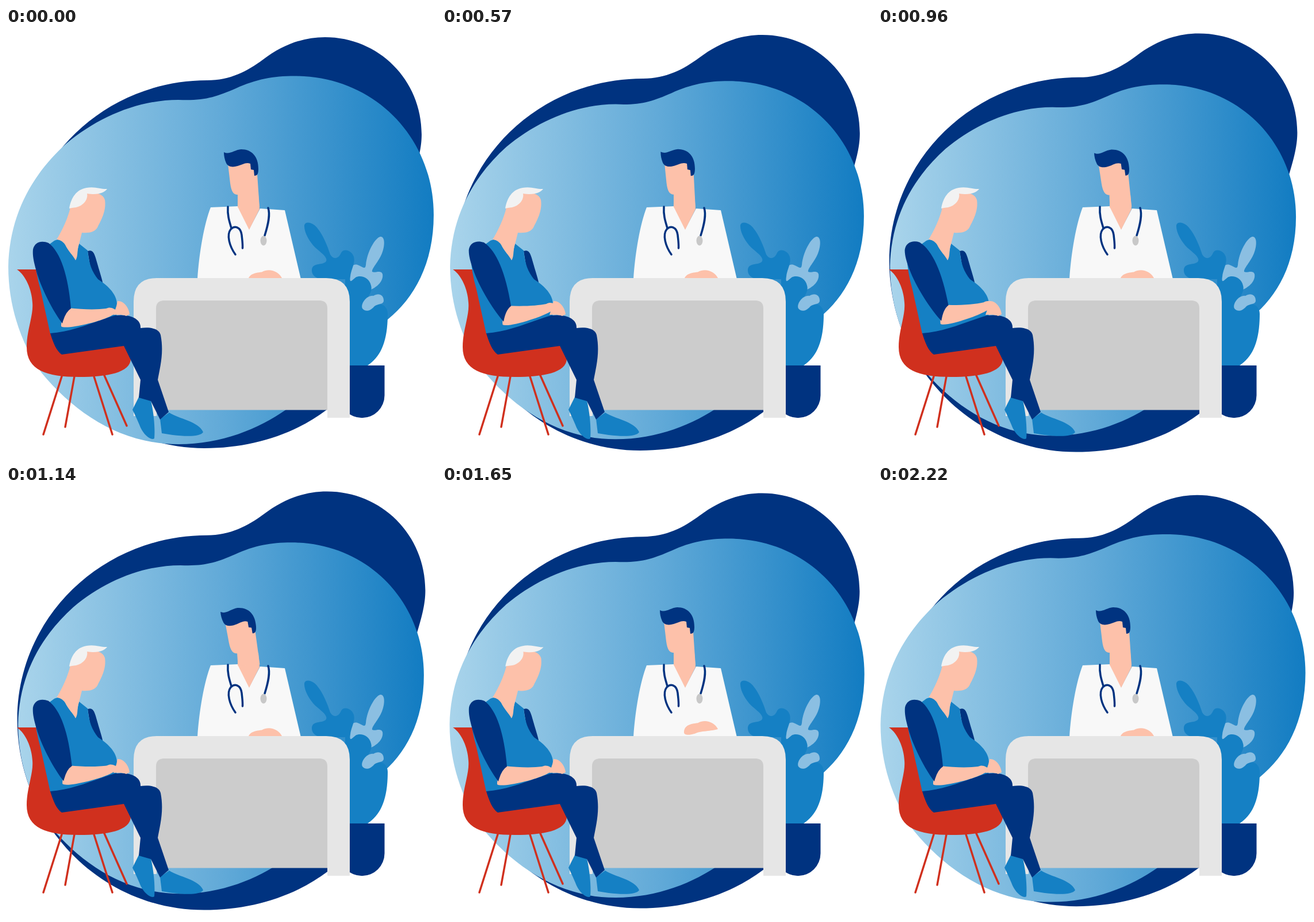
Write an HTML page that moves like this. It is 748 px wide and 748 px high and loops after 2250 ms.

```html
<!DOCTYPE html>
<html>
<head>
<meta charset="utf-8">
<style>
  html, body { margin: 0; width: 100%; height: 100%; overflow: hidden; background: #fff; }
  svg { display: block; width: 100vw; height: 100vh; }
  .navy { fill: #003380; }
  .blue { fill: #1580c4; }
  .pale { fill: #8bbfe2; }
  .skin { fill: #fdc1aa; }
  .red { fill: #d0301e; }
  .line { fill: none; stroke-linecap: round; stroke-width: 3.5; }
</style>
</head>
<body>
<svg viewBox="0 0 748 748">
  <defs>
    <linearGradient id="sky">
      <stop offset="0" stop-color="#a9d4eb"/>
      <stop offset=".5" stop-color="#62aad8"/>
      <stop offset="1" stop-color="#127cc2"/>
    </linearGradient>
  </defs>

  <path id="backBlob" class="navy" d="M26 405C26 231.600 171 91 350 91C390 91 420 75 447 55C480 30 515 16 555 16C648 16 723 90 723 185C723 225 708 265 625 500C612 570 595 620 558 664C500 708 425 731 345 731C169 731 26 585 26 405Z"/>
  <path id="frontBlob" fill="url(#sky)" d="M4 415C6 325 45 255 105 201C160 155 230 125 300 125C345 127 365 120 400 105C435 89 465 83.500 502 83.500C640 83.500 744 190 744 325C744 410 710 470 664 507C600 560 570 606 487 664C440 697 375 724 300 724C200 724 120 670 62 600C30 555 4 490 4 415Z"/>

  <g id="plant">
    <path class="pale" d="M598 460V420C602 411 609 410 614 413C622 417 625 420 626 412C628 390 642 365 651 363C660 362 659 380 654 392C648 407 636 418 637 424C641 427 652 420 655 428C657 440 646 450 635 455Z"/>
    <path class="blue" d="M590 587H629C652 572 664 545 664 497C664 484 653 477 643 482C634 487 631 496 624 488C614 480 640 465 635 448C632 434 617 429 608 434C601 440 597 445 599 432C600 420 608 410 605 398C601 386 587 383 583 391C579 401 570 404 564 394C559 378 551 360 543 350C535 338 521 335 519 343C518 355 528 372 538 382C548 391 562 400 556 407C548 413 534 408 532 420C531 431 541 437 552 437H590Z"/>
    <path class="pale" d="M620 488C616 480 628 464 639 466C648 460 657 464 657 474C657 482 645 479 640 485C632 494 624 493 620 488Z"/>
    <path class="navy" d="M580 587H658.500V639A39.250 39.250 0 0 1 580 639Z"/>
  </g>

  <g id="doctor">
    <path fill="#f8f8f8" d="M333 437C336 390 345 340 356 312L404 310 423 350 442 314 485 317 513 437Z"/>
    <path class="skin" d="M403 290V311L423 351 441 315 439 290Z"/>
    <g id="doctorHead">
      <path class="skin" d="M386 236L390 270C392 285 396 290 403 290V312H441L437 254 432 232 410 226Z"/>
      <path class="navy" d="M379 216C389 221 397 212 409 211C428 211 439 224 439 245C439 254 437 257 432 257L431 247 426 246 425 236C417 233 411 238 403 240C393 243 386 241 383 235C380 228 379 222 379 216Z"/>
    </g>
    <g class="line" stroke="#003380">
      <path d="M386 311C385 325 388 335 392 348"/>
      <path d="M399 394C389 380 383 360 391 350C398 343 408 346 410 360C411 370 412 376 411.500 383"/>
      <path d="M456 313C460 325 456 342 450 361"/>
    </g>
    <ellipse cx="448" cy="370" rx="5.500" ry="8.500" fill="#c8c8c8"/>
    <path id="doctorHand" class="skin" d="M421 441C421 429 431 426 445 424.500C458 417 474 423 480 435C470 439 448 438 440 443C430 446 421 446 421 441Z"/>
  </g>

  <g id="desk">
    <path fill="#e6e6e6" d="M222 675V476Q222 435 262 435H557Q598 435 598 476V678H559V664H262V675Z"/>
    <path fill="#ccc" d="M261 664.500V488Q261 474 275 474H545Q559 474 559 488V664.500Z"/>
  </g>

  <g id="chair">
    <path class="red" d="M19 420H60L75 480 85 532 97 567 205 552 217 575C217 600 175 607 127 607C70 607 36 595 36 555C36 525 48 500 46 478C45 455 34 430 19 420Z"/>
    <path class="line" stroke="#d0301e" d="M97 606L65 707M119 606L103 694M153 606L185 707M170 602L210 692"/>
  </g>

  <g id="patient">
    <path class="blue" d="M232 640L252 648C255 660 260 690 258 714C252 718 240 708 234 695C228 680 223 670 220 664Z"/>
    <path class="blue" d="M268 680L284 669C300 680 335 684 343 703C338 711 315 711 290 708L271 705Z"/>
    <path class="navy" d="M142 388C150 385 153 390 156 400C163 425 168 438 169 448L150 437Z"/>
    <path class="blue" d="M84 370C92 366 99 369 103 377C110 390 118 396 121 404L127 375 142 387C144 410 150 425 160 437C180 450 194 465 193 483L192 510 140 530 77 532 60 455Q51 425 50 395Z"/>
    <path class="navy" d="M77 531C120 528 160 508 190 500C215 497 235 505 234 522C250 520 266 522 269 534C275 565 268 590 264 612L283 668 268 681 252 649 231 643 234 612 205 553 97 568C88 562 82 548 77 531Z"/>
    <g id="patientHead">
      <path class="skin" d="M88 368C98 352 108 330 112 312L140 288C150 285 168 286 172 299C175 318 165 335 160 345C156 355 145 357 132 356L127 376C123 385 126 397 121 404C117 396 108 388 103 377C98 370 92 368 88 368Z"/>
      <path fill="#f2f2f2" d="M110 314C113 296 122 281 140 278C155 275 166 281 176 280C170 287 160 291 141 288C143 298 135 309 122 312C116 313 112 313 110 314Z"/>
    </g>
    <path class="skin" d="M187 499L192 484 194 475C205 474 214 487 215 498L209 501C202 498 195 499 187 499Z"/>
    <g id="arm">
      <path id="forearm" class="skin" d="M108 487C135 490 160 490 174 488C182 484 188 488 196 494L189 497C178 505 150 514 120 519C108 521 98 521 96 519C95 508 102 495 108 487Z"/>
      <path class="navy" d="M47 385C50 372 62 369 74 374C95 390 108 430 113 488Q103 494 98 514C80 490 60 450 52 420C48 405 46 395 47 385Z"/>
    </g>
  </g>
</svg>
<script>
const LOOP = 2250;
const part = id => document.getElementById(id);

// Linear interpolation through [time, value] keys
function track(t, keys) {
  for (let i = 1; i < keys.length; i++) {
    const [t0, v0] = keys[i - 1], [t1, v1] = keys[i];
    if (t <= t1) return v0 + (v1 - v0) * (t - t0) / (t1 - t0);
  }
  return keys[keys.length - 1][1];
}

function scale(id, cx, cy, s) {
  part(id).setAttribute('transform', `translate(${cx} ${cy}) scale(${s}) translate(${-cx} ${-cy})`);
}

function rotate(id, cx, cy, angle) {
  part(id).setAttribute('transform', `rotate(${angle} ${cx} ${cy})`);
}

function draw(t) {
  const pulse = track(t, [[0, 0], [1050, 1], [LOOP, 0]]);
  scale('backBlob', 374, 373.5, 1 + 0.02 * pulse);
  scale('frontBlob', 374, 404, 1 - 0.05 * pulse);

  rotate('doctorHead', 421, 304, track(t, [[0, 0], [400, 1.6], [800, 0], [1130, -4], [1530, 0], [LOOP, 0]]));
  const raise = track(t, [[0, 0], [1170, 0], [1470, 1], [1800, 0], [LOOP, 0]]);
  part('doctorHand').setAttribute('transform', `translate(0 ${-27 * raise})`);

  rotate('patientHead', 105, 370, track(t, [[0, 0], [1600, 0], [1900, 1.5], [2200, 0], [LOOP, 0]]));
  const reach = track(t, [[0, 0], [400, 0], [800, 1], [1180, 0], [LOOP, 0]]);
  rotate('arm', 60, 390, -10 * reach);
  rotate('forearm', 97, 519, 1.5 * reach);
}

function tick() {
  draw(performance.now() % LOOP);
  requestAnimationFrame(tick);
}
tick();
</script>
</body>
</html>
```
